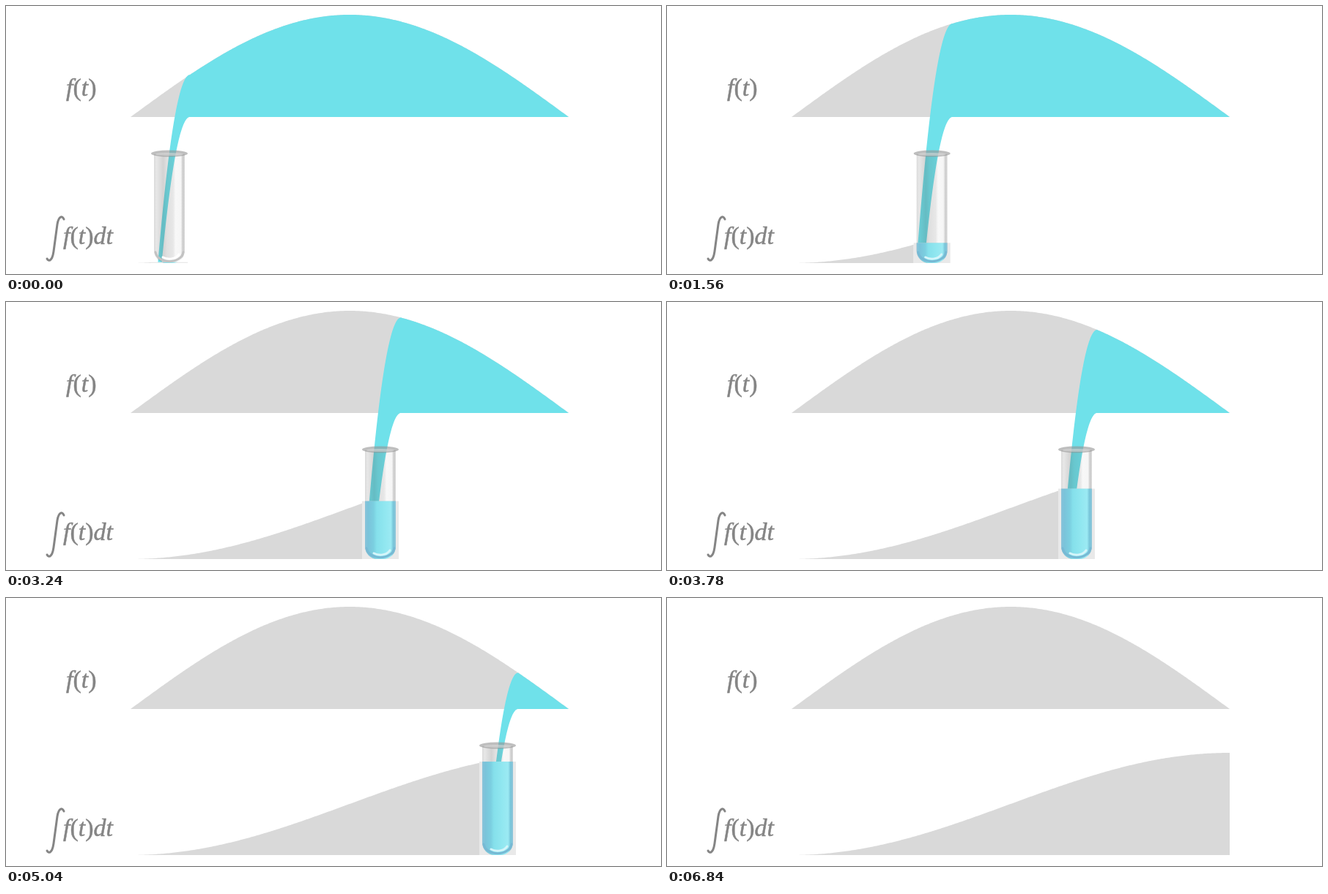
Recreate the animation shown at these times as an HTML page with a canvas. Size 894x367 px, loop 7020 ms.

```html
<!DOCTYPE html>
<html lang="en">
<head>
<meta charset="utf-8">
<title>Integral as a filling tube</title>
<style>
  html, body { margin: 0; width: 100%; height: 100%; overflow: hidden; background: #fff; }
  canvas { display: block; }
</style>
</head>
<body>
<canvas id="stage" width="894" height="367"></canvas>
<script>
const ctx = document.getElementById('stage').getContext('2d');
const LEFT = 170, RIGHT = 768, HEIGHT = 140, BASE = 152, FLOOR = 352;
const STEP = 60, LOOP = 7020, LAST = 114;
const GRAY = '#d9d9d9', CYAN = '#6fe1ea', INK = '#858585';

const phase = x => Math.PI * Math.min(1, Math.max(0, (x - LEFT) / (RIGHT - LEFT)));
const hump = x => BASE - HEIGHT * Math.sin(phase(x));
const area = x => FLOOR - HEIGHT * (1 - Math.cos(phase(x))) / 2;

function fill(points, color) {
  ctx.beginPath();
  points.forEach(([x, y]) => ctx.lineTo(x, y));
  ctx.closePath();
  ctx.fillStyle = color;
  ctx.fill();
}

function curve(f, from, to) {
  const points = [];
  for (let x = from; x < to; x += 2) points.push([x, f(x)]);
  points.push([to, f(to)]);
  return points;
}

// Falling edge of the stream: a parabola thrown to the left
function fall(x, top, bottom) {
  const points = [];
  for (let i = 0; i <= 40; i++) {
    const drop = (bottom - top) * (i / 40) ** 2;
    points.push([x - Math.sqrt(drop / 0.135), top + drop]);
  }
  return points;
}

function across(x, width, stops) {
  const g = ctx.createLinearGradient(x, 0, x + width, 0);
  stops.forEach(([at, color]) => g.addColorStop(at, color));
  return g;
}

const shade = a => `rgba(70,70,70,${a})`;

function tubePath(x) {
  ctx.beginPath();
  ctx.roundRect(x + 4, 203, 42, 149, [0, 0, 17, 17]);
}

function tube(x, level) {
  ctx.save();
  tubePath(x);
  ctx.clip();
  ctx.fillStyle = across(x + 4, 42, [
    [0, shade(.2)], [.08, shade(.13)], [.3, shade(.24)], [.42, shade(.17)],
    [.62, shade(.13)], [.7, shade(.04)], [.87, shade(.05)], [.94, shade(.28)], [1, shade(.2)]
  ]);
  ctx.fillRect(x, 203, 50, 150);
  ctx.fillStyle = across(x + 4, 42, [
    [0, '#8ac3d9'], [.1, '#7ac3da'], [.28, '#7bcfe0'], [.38, '#85e0eb'],
    [.65, '#91e7f0'], [.84, '#9beaf3'], [.92, '#78c5d9'], [1, '#8fc5d9']
  ]);
  ctx.fillRect(x, level, 50, FLOOR - level);
  ctx.restore();

  // Rounded glass bottom with its highlight
  const full = Math.min(1, (FLOOR - level) / 20);
  ctx.lineCap = 'round';
  ctx.lineWidth = 3;
  ctx.strokeStyle = full > .5 ? '#77b9d4' : '#c2c2c2';
  ctx.beginPath();
  ctx.moveTo(x + 6, 337);
  ctx.bezierCurveTo(x + 9, 354, x + 41, 354, x + 44, 337);
  ctx.stroke();
  ctx.strokeStyle = full > .5 ? '#d5f5fa' : '#fff';
  ctx.beginPath();
  ctx.moveTo(x + 16, 344);
  ctx.bezierCurveTo(x + 21, 347, x + 33, 348, x + 38, 340);
  ctx.stroke();

  // Rim
  ctx.beginPath();
  ctx.ellipse(x + 25, 202, 25, 4.5, 0, 0, 7);
  ctx.fillStyle = 'rgba(150,150,150,.62)';
  ctx.fill();
  ctx.beginPath();
  ctx.ellipse(x + 25, 203, 19, 2, 0, 0, 7);
  ctx.fillStyle = 'rgba(225,225,225,.5)';
  ctx.fill();
}

function formula(x, y, text) {
  ctx.fillStyle = ctx.strokeStyle = INK;
  ctx.lineWidth = .5;
  for (const c of text) {
    ctx.font = `${/[()]/.test(c) ? '' : 'italic '}34px "Liberation Serif", serif`;
    ctx.fillText(c, x, y);
    ctx.strokeText(c, x, y);
    x += ctx.measureText(c).width;
  }
}

function integralSign() {
  ctx.strokeStyle = INK;
  ctx.lineCap = 'round';
  ctx.lineWidth = 3;
  ctx.beginPath();
  ctx.moveTo(79, 292);
  ctx.bezierCurveTo(77, 287, 72, 287, 70, 299);
  ctx.lineTo(65, 336);
  ctx.bezierCurveTo(63, 350, 58, 350, 56, 346);
  ctx.stroke();
}

function draw(now) {
  const step = Math.min(LAST, Math.floor(now % LOOP / STEP));
  const front = 248 + step * 16 / 3;
  const left = front - 50;
  const level = area(left + 8.5);
  const edge = Math.min(RIGHT, left);

  ctx.fillStyle = '#fff';
  ctx.fillRect(0, 0, 894, 367);
  formula(82, 123, 'f(t)');
  integralSign();
  formula(78, 326, 'f(t)dt');

  fill(curve(hump, LEFT, RIGHT), GRAY);
  fill([...curve(area, LEFT, edge), [edge, FLOOR], [LEFT, FLOOR]], GRAY);

  if (left < RIGHT) {
    ctx.fillStyle = '#e9e9e9';
    ctx.fillRect(left, level, Math.min(RIGHT, front) - left, FLOOR - level);
  }

  const lip = front + 3;
  if (lip < RIGHT) {
    fill([
      ...curve(hump, lip, RIGHT),
      ...fall(lip, BASE, level),
      ...fall(lip, hump(lip), level).reverse()
    ], CYAN);
  }

  if (step < LAST) {
    ctx.globalAlpha = Math.min(1, (LAST - step) / 6);
    tube(Math.min(left, 790), level);
    ctx.globalAlpha = 1;
  }
}

const start = performance.now();
function tick() {
  draw(performance.now() - start);
  requestAnimationFrame(tick);
}
tick();
</script>
</body>
</html>
```
